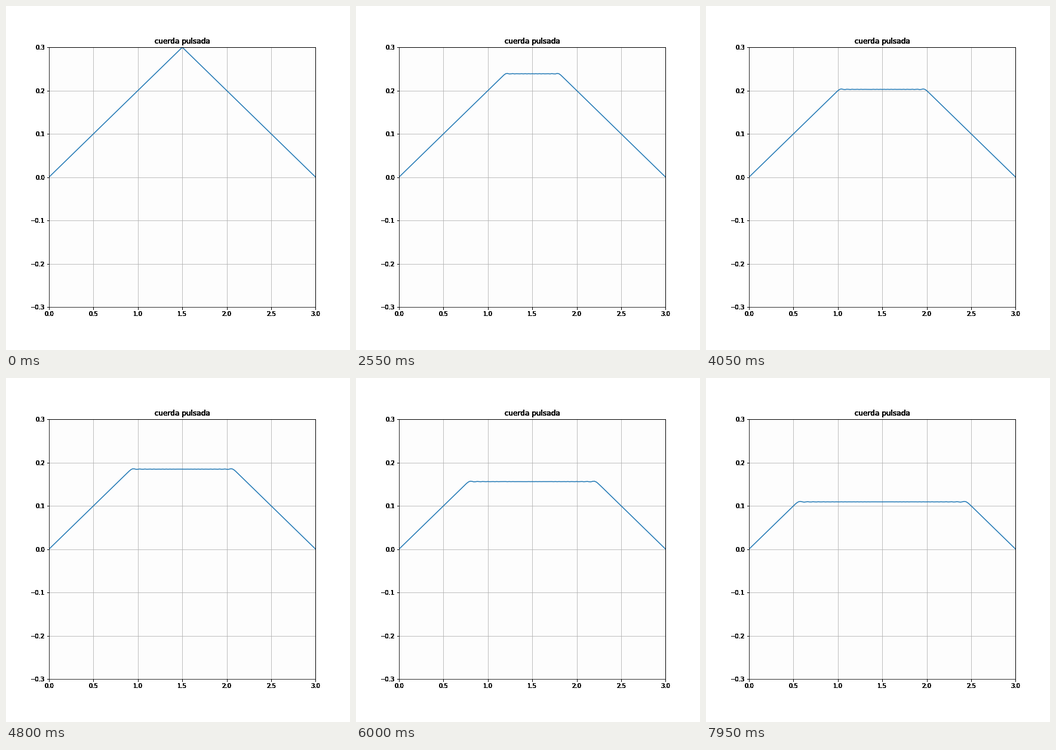
A matplotlib script for the animation above (8 s loop, 576 by 576 pixels).

```python
import numpy as np
import matplotlib.pyplot as plt
from matplotlib.animation import FuncAnimation

LENGTH, HEIGHT = 3.0, 0.3
CELLS = 150
COURANT = 0.9
STEPS = 54
TICK_MS, TICKS_PER_STEP, TICKS = 50, 3, 160


def plucked_string():
    """Explicit finite differences for a string released from a triangle."""
    x = np.linspace(0, LENGTH, CELLS + 1)
    shape = HEIGHT * (1 - np.abs(2 * x / LENGTH - 1))
    states = np.zeros((STEPS, CELLS + 1))
    states[0] = shape

    def bend(u):
        return COURANT**2 * (u[2:] - 2 * u[1:-1] + u[:-2])

    states[1, 1:-1] = shape[1:-1] + bend(shape) / 2
    for n in range(1, STEPS - 1):
        now, before = states[n], states[n - 1]
        states[n + 1, 1:-1] = 2 * now[1:-1] - before[1:-1] + bend(now)
    return x, states


def harden(artist, passes=10):
    """Draw an artist several times so its soft edges turn solid."""
    draw_once = artist.draw

    def draw(renderer):
        for _ in range(passes):
            draw_once(renderer)

    artist.draw = draw


plt.rcParams.update({"font.family": "DejaVu Sans", "font.size": 10})
fig = plt.figure(figsize=(8, 8), dpi=72, facecolor="white")
fig.subplots_adjust(left=0.125, right=0.9, bottom=0.125, top=0.88)
ax = fig.add_subplot(facecolor="#fdfdfd")
ax.set_xticks(np.arange(7) / 2)
ax.set_yticks(np.arange(-3, 4) / 10)
ax.set(xlim=(0, LENGTH), ylim=(-HEIGHT, HEIGHT))
ax.set_title("cuerda pulsada", fontsize=12)
ax.grid(True)

for artist in (ax.title, ax.spines["top"], ax.spines["right"],
               *ax.get_xticklabels(), *ax.get_yticklabels(),
               *ax.get_xticklines(), *ax.get_yticklines()):
    harden(artist)

x, states = plucked_string()
line, = ax.plot(x, states[0], color="#1f77b4", linewidth=1.5)


def update(tick):
    line.set_ydata(states[tick // TICKS_PER_STEP])
    return line,


anim = FuncAnimation(fig, update, frames=TICKS, interval=TICK_MS,
                     repeat=True, repeat_delay=0)
plt.show()
```
